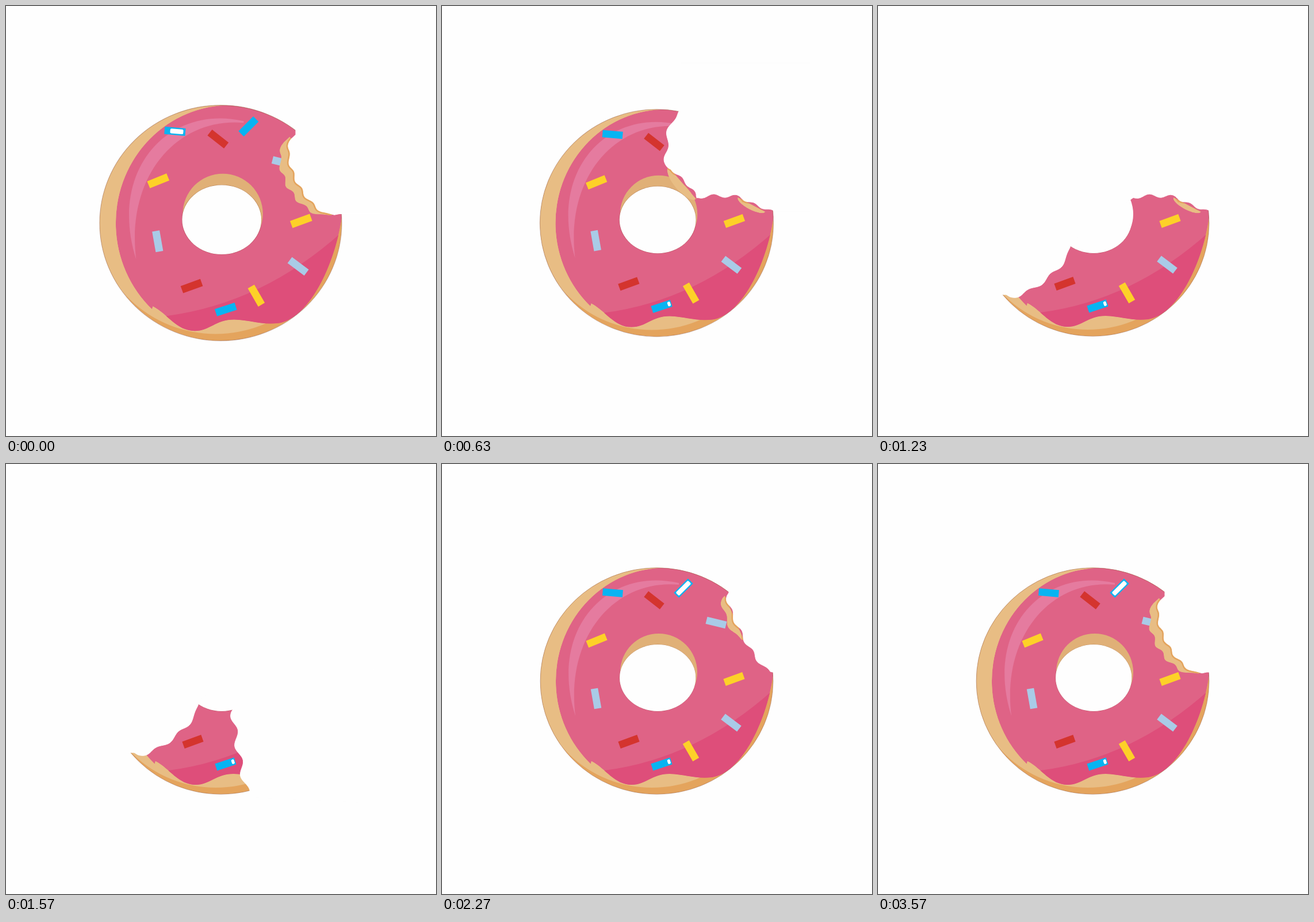
An HTML page with a canvas for the animation above (3610 ms loop, 748 px wide and 748 px high).

```html
<!DOCTYPE html>
<html>
<head>
<meta charset="utf-8">
<title>Donut</title>
<style>
html, body { margin: 0; width: 100%; height: 100%; overflow: hidden; background: #fefefe; }
canvas { display: block; }
</style>
</head>
<body>
<canvas id="stage" width="748" height="748"></canvas>
<script>
const ctx = document.getElementById('stage').getContext('2d');
const LOOP = 3610, CX = 373.5, CY = 377.5;
const C = {
  bg: '#fefefe', dough: '#e8bd84', crust: '#e4a45d', rim: '#e0b077', outline: 'rgba(130,70,50,.4)',
  pink: '#df6386', shade: '#de4e7a', shine: '#e57b9f',
  blue: '#07b4f2', red: '#d4342e', yellow: '#fdd128', pale: '#a9cbe7'
};

function oval(x, y, rx, ry) {
  const path = new Path2D();
  path.ellipse(x, y, rx, ry, 0, 0, 2 * Math.PI);
  return path;
}

function fill(path, color) {
  ctx.fillStyle = color;
  ctx.fill(path);
}

// Wavy arc from a to b; positive depth bends it to the right of its direction.
function toothmarks({ a, b, depth, waves = 0, size = 3 }) {
  const dx = b[0] - a[0], dy = b[1] - a[1], length = Math.hypot(dx, dy);
  const points = [];
  for (let i = 0; i <= 60; i++) {
    const t = i / 60, arch = (4 * t * (1 - t)) ** 0.5;
    const wave = size * Math.sin(2 * Math.PI * waves * t) * Math.min(1, 3 * arch);
    const off = (depth * arch + wave) / length;
    points.push([a[0] + dx * t - dy * off, a[1] + dy * t + dx * off]);
  }
  return points;
}

function polygon(points) {
  const path = new Path2D();
  points.forEach(([x, y]) => path.lineTo(x, y));
  path.closePath();
  return path;
}

const eaten = (edges, corners) => polygon([...edges.flatMap(toothmarks), ...corners]);
const crumb = (a, b, depth, waves = 0) => polygon(toothmarks({ a, b, depth, waves }));

const body = oval(CX, CY, 202.5, 197);
const lightDough = oval(365, 368, 202, 195);
const ring = oval(377, 362, 67, 67);
const hole = oval(375.2, 372, 66.2, 58);

const icing = new Path2D();
icing.ellipse(388, CY, 190, 197, 0, 2.32, 6.2);
icing.addPath(new Path2D());
icing.lineTo(577, 362);
icing.bezierCurveTo(565, 450, 520, 538, 470, 545);
icing.bezierCurveTo(440, 548, 425, 540, 396, 539);
icing.bezierCurveTo(365, 539, 355, 558, 330, 558);
icing.bezierCurveTo(300, 558, 285, 530, 260, 517);
const shadow = new Path2D('M577 392 Q444 512 283 533 L200 600 H620 Z');
const shine = new Path2D('M412 207 C285 178 185 290 232 438 C215 300 300 200 412 210 Z');

// A glint is [from ms, to ms, left end, width].
const sprinkles = [
  { x: 297, y: 224, turn: 5, color: 'blue', glint: [0, 70, -8, 22] },
  { x: 369, y: 237, turn: 38, color: 'red' },
  { x: 420, y: 216, turn: -45, color: 'blue', glint: [2270, LOOP, -15, 30] },
  { x: 269, y: 307, turn: -22, color: 'yellow' },
  { x: 268, y: 408, turn: 80, color: 'pale' },
  { x: 325, y: 483, turn: -20, color: 'red' },
  { x: 382, y: 522, turn: -18, color: 'blue', glint: [600, LOOP, 11, 5] },
  { x: 433, y: 499, turn: 60, color: 'yellow' },
  { x: 503, y: 450, turn: 37, color: 'pale' },
  { x: 508, y: 374, turn: -20, color: 'yellow' },
  { x: 477, y: 276, turn: 14, color: 'pale' }
];

const rightEdges = [
  { a: [443, 334], b: [520, 334], depth: -4, waves: 2 },
  { a: [520, 333], b: [580, 358], depth: 2, waves: 2, size: 2 }
];
const rightCrumb = crumb([514, 333], [562, 358], 9);
const FAR = [[640, 358], [640, 100]];

// What is left once the upper half is gone, cut by one more bite on the left.
const remains = (a, b, depth, waves) => ({
  gone: [eaten([{ a, b, depth, waves }, ...rightEdges], [...FAR, [100, 100], [100, a[1]]])],
  crumbs: [rightCrumb], open: true
});

function biteOff(state, a, b) {
  const cut = eaten([{ a, b, depth: 5, waves: 3, size: 5 }], [[640, 590], [640, 100], [a[0], 100]]);
  return { ...state, gone: [...state.gone, cut] };
}

const nibble = {
  gone: [eaten([{ a: [499, 224], b: [575, 362], depth: 15, waves: 4 }], [[640, 362], [640, 190], [499, 190]])],
  crumbs: [crumb([492, 229], [525, 306], 14, 2)]
};
const bite = {
  gone: [eaten([{ a: [499, 230], b: [572, 362], depth: 36, waves: 5, size: 2.5 }],
    [[640, 362], [640, 190], [499, 190]])],
  crumbs: [crumb([489, 233], [568, 361], 47, 5)]
};
const quarter = {
  gone: [eaten([
    { a: [415, 183], b: [397, 284], depth: 14, waves: 2, size: -4 },
    { a: [397, 284], b: [442, 330], depth: -3, waves: 2, size: 2 },
    ...rightEdges
  ], [...FAR, [415, 100]])],
  crumbs: [rightCrumb, crumb([394, 280], [442, 336], 14)]
};
const half = remains([185, 310], [306, 359], 24, 3);
const leftBite = remains([170, 372], [315, 400], 24, 3);
const slice = remains([223, 502], [333, 413], 23, 3);
const piece = biteOff(slice, [396, 425], [424, 580]);
const last = biteOff(slice, [328, 410], [350, 585]);

const timeline = [
  [0, bite], [300, quarter], [660, half], [1100, leftBite], [1150, slice],
  [1460, piece], [1760, last], [1800, null], [2270, nibble], [2340, bite]
];

function drawSprinkle({ x, y, turn, color, glint }, t) {
  ctx.save();
  ctx.translate(x, y);
  ctx.rotate(turn * Math.PI / 180);
  ctx.fillStyle = C[color];
  ctx.fillRect(-17.5, -6.3, 35, 12.6);
  if (glint && t >= glint[0] && t < glint[1]) {
    ctx.fillStyle = '#fff';
    ctx.beginPath();
    ctx.roundRect(glint[2], -4, glint[3], 8, 2);
    ctx.fill();
  }
  ctx.restore();
}

function drawCrumb(shape, gone) {
  ctx.save();
  ctx.clip(shape);
  fill(shape, C.dough);
  ctx.strokeStyle = C.crust;
  ctx.lineWidth = 6;
  ctx.stroke(gone);
  ctx.restore();
}

function drawDonut(state, t) {
  ctx.save();
  ctx.clip(body);
  fill(body, C.crust);
  fill(lightDough, C.dough);
  ctx.clip(icing);
  fill(icing, C.pink);
  fill(shadow, C.shade);
  fill(shine, C.shine);
  ctx.restore();

  sprinkles.forEach(s => drawSprinkle(s, t));
  ctx.strokeStyle = C.outline;
  ctx.lineWidth = 1;
  ctx.stroke(body);
  if (!state.open) fill(ring, C.rim);
  state.crumbs.forEach(shape => drawCrumb(shape, state.gone[0]));
  ctx.strokeStyle = C.outline;
  ctx.lineWidth = 1;
  ctx.stroke(hole);
  fill(hole, C.bg);
  if (state.open) fill(ring, C.bg);
  state.gone.forEach(path => fill(path, C.bg));
  // Hides the antialiased rim of the body inside the eaten areas.
  ctx.strokeStyle = C.bg;
  state.gone.forEach(path => ctx.stroke(path));
}

function render(now) {
  const t = now % LOOP;
  ctx.fillStyle = C.bg;
  ctx.fillRect(0, 0, 748, 748);
  const state = timeline.filter(([start]) => start <= t).pop()[1];
  if (!state) return;
  const settle = t < 70 ? 1 : Math.max(0, 1 - t / 800) ** 1.6;
  const scale = 1 + 0.04 * settle;
  ctx.save();
  ctx.translate(CX, CY);
  ctx.scale(scale, scale);
  ctx.translate(-CX, -CY);
  drawDonut(state, t);
  ctx.restore();
}

const begin = performance.now();
function tick() {
  render(performance.now() - begin);
  requestAnimationFrame(tick);
}
tick();
</script>
</body>
</html>
```
